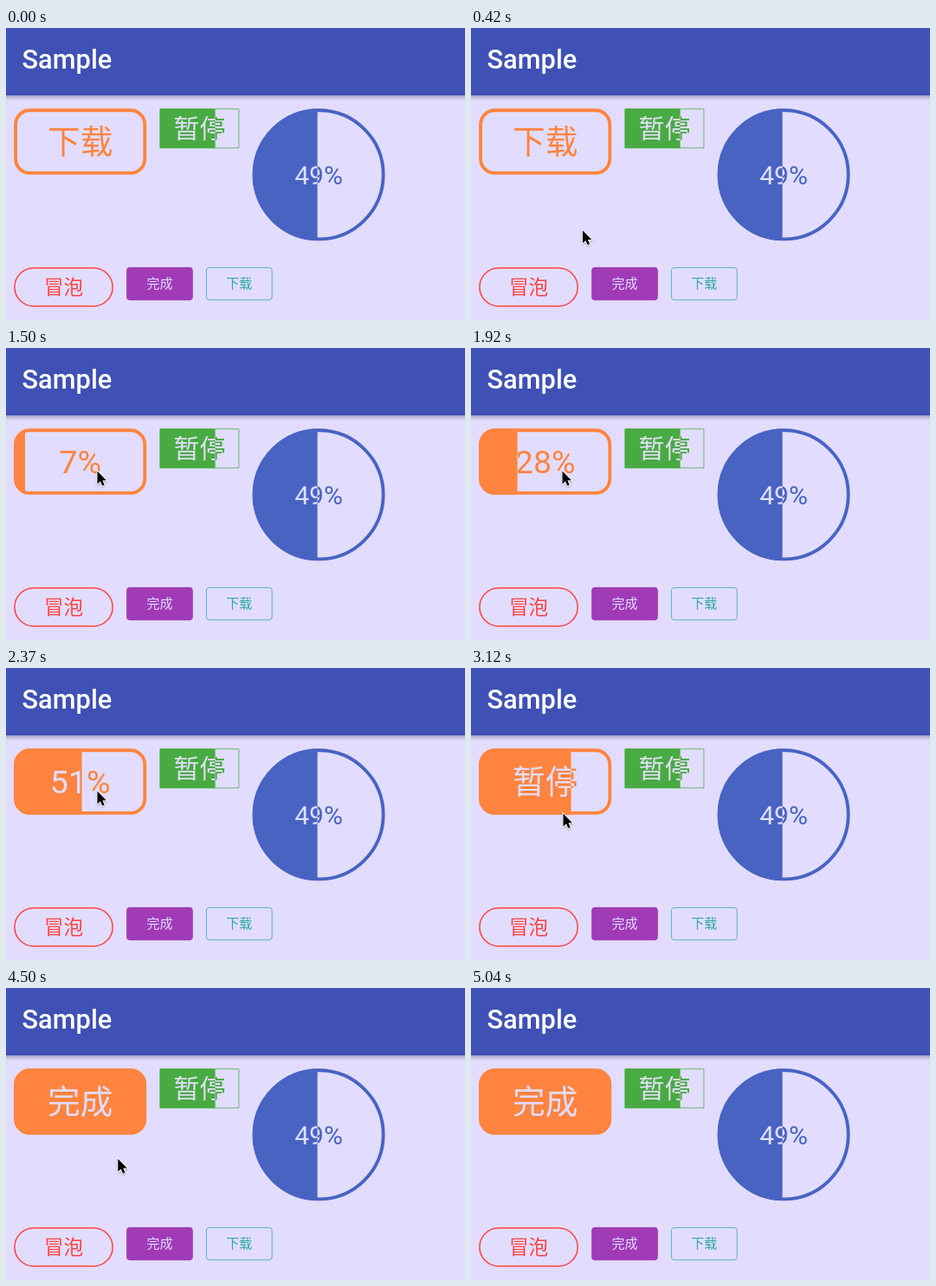
Write an HTML page with a canvas that moves like this. It is 530 px wide and 338 px high and loops after 5.34 s.

```html
<!DOCTYPE html>
<html lang="zh-CN">
<head>
<meta charset="utf-8">
<title>Sample</title>
<style>
  html, body { margin: 0; width: 100%; height: 100%; overflow: hidden; background: #e2ddff; }
  canvas { display: block; }
</style>
</head>
<body>
<canvas width="530" height="338"></canvas>
<script>
const ctx = document.querySelector('canvas').getContext('2d');
const LOOP = 5340, STEP = 30;
const DP = 1.53; // pixels per layout unit
const LAVENDER = '#e2ddff';
const FONT = 'Roboto, "Noto Sans CJK SC", "Noto Sans CJK", sans-serif';

// Moments of the story, in ms
const ENTER = 120, ARRIVE = 690, START = 1356, PAUSE = 2760, RESUME = 3600, DONE = 3870, LEAVE = 5040;
const TAP_LENGTH = 330;
const taps = [
  { at: 1170, x: 105, y: 142 },
  { at: 2520, x: 105, y: 142 },
  { at: 3480, x: 124, y: 143 }
];

const clamp = (v, min, max) => Math.min(max, Math.max(min, v));
const portion = (t, start, end) => clamp((t - start) / (end - start), 0, 1);

function bezier(k, a, b, c, d) {
  const m = 1 - k;
  return m * m * m * a + 3 * m * m * k * b + 3 * m * k * k * c + k * k * k * d;
}

function cursorPosition(t) {
  const k = portion(t, ENTER, ARRIVE);
  let x = bezier(k, -12, 60, 235, 109);
  let y = bezier(k, 228, 270, 235, 146);
  const glide = (start, end, toX, toY) => {
    const p = portion(t, start, end);
    x += (toX - x) * p;
    y += (toY - y) * p;
  };
  glide(930, 960, 105, 142);
  glide(3000, 3120, 106, 168);
  glide(3180, 3390, 124, 143);
  glide(RESUME, 3750, 124, 184);
  glide(3750, DONE, 115, 223);
  glide(4440, 4980, 239, -9);
  return [x, y];
}

function downloadState(t) {
  if (t < START) return { text: '下载' };
  if (t >= DONE) return { text: '完成', percent: 100 };
  const percent = t < RESUME
    ? 70 * portion(t, START, PAUSE - 20)
    : 70 + 30 * portion(t, RESUME, DONE + 10);
  const paused = t >= PAUSE && t < RESUME;
  return { text: paused ? '暂停' : Math.floor(percent) + '%', percent };
}

function label(text, x, y, size, color) {
  ctx.font = `${text.endsWith('%') ? 400 : 500} ${size}px ${FONT}`;
  ctx.textAlign = 'center';
  ctx.fillStyle = color;
  ctx.fillText(text, x, y + size * 0.36);
}

// Outlined button, partly filled from the left; the label inverts over the fill
function button(x, y, { w, h, radius, line, color, text, size, percent = 0 }) {
  const cx = x + w / 2, cy = y + h / 2;
  ctx.strokeStyle = color;
  ctx.lineWidth = line;
  ctx.beginPath();
  ctx.roundRect(x + line / 2, y + line / 2, w - line, h - line, Math.max(0, radius - line / 2));
  ctx.stroke();
  label(text, cx, cy, size, color);
  if (!percent) return;

  ctx.save();
  ctx.beginPath();
  ctx.rect(x, y, percent < 100 ? line / 2 + (w - line) * percent / 100 : w, h);
  ctx.clip();
  ctx.beginPath();
  ctx.roundRect(x, y, w, h, radius);
  ctx.fillStyle = color;
  ctx.fill();
  label(text, cx, cy, size, LAVENDER);
  ctx.restore();
}

function row(y, buttons) {
  let x = 6;
  for (const spec of buttons) {
    button(x, y, spec);
    x += spec.w + 10;
  }
}

function header() {
  const shadow = ctx.createLinearGradient(0, 78, 0, 84);
  shadow.addColorStop(0, 'rgba(0,0,0,.26)');
  shadow.addColorStop(1, 'rgba(0,0,0,0)');
  ctx.fillStyle = shadow;
  ctx.fillRect(0, 78, 530, 6);
  ctx.fillStyle = '#3f51b5';
  ctx.fillRect(0, 0, 530, 78);
  ctx.font = '500 30.8px Roboto, sans-serif';
  ctx.textAlign = 'left';
  ctx.fillStyle = '#fff';
  ctx.fillText('Sample', 18.5, 47.3);
}

function touchMark({ at, x, y }, t) {
  if (t < at || t >= at + TAP_LENGTH) return;
  ctx.fillStyle = `rgba(235,228,240,${0.22 * Math.min(1, (at + TAP_LENGTH - t) / 60)})`;
  ctx.beginPath();
  ctx.arc(x, y, 16.5, 0, 7);
  ctx.fill();
}

function cursor([x, y]) {
  const arrow = new Path2D('M0 0V16L3.7 12.6 6.2 18.2 8.8 17.1 6.4 11.6H11.3Z');
  ctx.save();
  ctx.translate(x + 0.5, y + 0.5);
  ctx.scale(0.93, 0.93);
  ctx.shadowColor = 'rgba(0,0,0,.3)';
  ctx.shadowBlur = 2;
  ctx.shadowOffsetY = 1;
  ctx.strokeStyle = '#fff';
  ctx.lineWidth = 2;
  ctx.stroke(arrow);
  ctx.shadowColor = 'transparent';
  ctx.fillStyle = '#000';
  ctx.fill(arrow);
  ctx.restore();
}

function draw(t) {
  ctx.fillStyle = LAVENDER;
  ctx.fillRect(0, 0, 530, 338);
  header();

  ctx.save();
  ctx.scale(DP, DP);
  row(61, [
    { w: 100, h: 50, radius: 12, line: 2.5, color: '#ff843f', size: 24.6, ...downloadState(t) },
    { w: 60, h: 30, radius: 0, line: 0.5, color: '#48ab42', size: 19.6, text: '暂停', percent: 70 },
    { w: 100, h: 100, radius: 50, line: 2.5, color: '#4863c2', size: 19.6, text: '49%', percent: 49 }
  ]);
  row(181, [
    { w: 75, h: 30, radius: 15, line: 1, color: '#ff4343', size: 14.8, text: '冒泡' },
    { w: 50, h: 25, radius: 2.5, line: 0.5, color: '#a03ab6', size: 9.8, text: '完成', percent: 100 },
    { w: 50, h: 25, radius: 2.5, line: 0.5, color: '#2fa9a4', size: 9.8, text: '下载' }
  ]);
  ctx.restore();

  taps.forEach(tap => touchMark(tap, t));
  if (t >= ENTER && t < LEAVE) cursor(cursorPosition(t));
}

const began = performance.now();
function tick() {
  const t = (performance.now() - began) % LOOP;
  draw(Math.floor(t / STEP) * STEP);
  requestAnimationFrame(tick);
}
tick();
</script>
</body>
</html>
```
